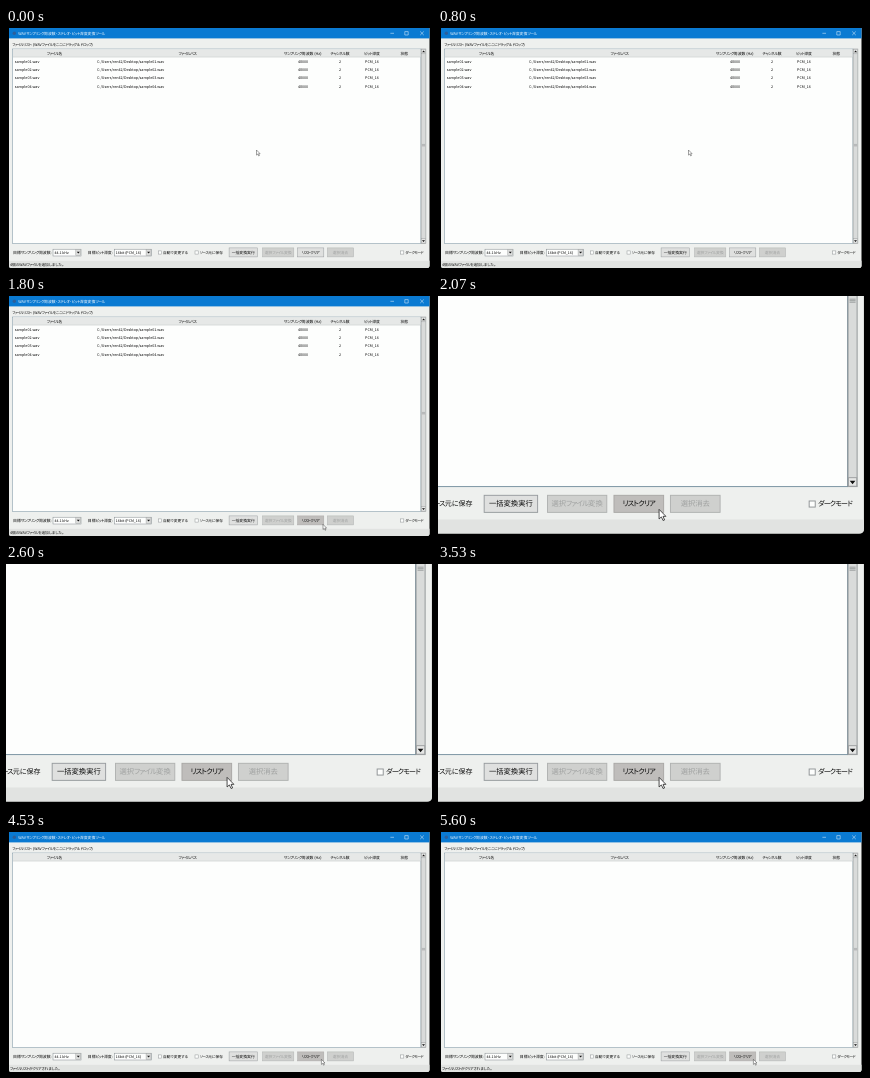
An HTML page that plays this animation: 426x240 px, repeating every 5790 ms.

```html
<!DOCTYPE html>
<html>
<head>
<meta charset="utf-8">
<title>WAV converter</title>
<style>
  html, body { margin: 0; width: 100%; height: 100%; overflow: hidden; background: #000; }
  svg { display: block; width: 100vw; height: 100vh; }
  text {
    font-family: "Noto Sans CJK JP", "Noto Sans CJK", "Noto Sans", sans-serif;
    font-feature-settings: "palt";
    text-rendering: geometricPrecision;
    white-space: pre;
  }
  .kana { letter-spacing: -0.11em; }
</style>
</head>
<body>
<svg id="stage" viewBox="0 0 426 240"></svg>
<script>
const NS = "http://www.w3.org/2000/svg";
const LOOP = 5790;
const TICK = 1000 / 15;
const ZOOM = { from: 2070, to: 3600, matrix: "matrix(1.895 0 0 1.895 -376.6 -217.4)" };
const HOVER_AT = 1600;
const CLEAR_AT = 4470;
const BAR_Y = 224.4;

// time, x, y of the pointer tip
const PATH = [
  [1100, 250.5, 122],
  [1200, 282, 166],
  [1330, 321, 220.5],
  [1470, 322, 224],
  [1780, 317, 228.4]
];

function add(parent, tag, attrs) {
  const el = document.createElementNS(NS, tag);
  for (const k in attrs) el.setAttribute(k, attrs[k]);
  parent.appendChild(el);
  return el;
}

const win = add(document.getElementById("stage"), "g", {});

function box(x, y, width, height, fill, stroke, parent = win) {
  const attrs = { x, y, width, height, fill };
  if (stroke) Object.assign(attrs, { stroke, "stroke-width": 0.5 });
  return add(parent, "rect", attrs);
}

function line(d, stroke, width = 0.5, parent = win) {
  return add(parent, "path", { d, stroke, "stroke-width": width, fill: "none" });
}

// Katakana runs are set tighter than the rest of the text.
function setText(el, str) {
  el.textContent = "";
  for (const run of str.split(/([ァ-ヺー]+)/).filter(Boolean)) {
    const kana = /^[ァ-ヺー]/.test(run);
    add(el, "tspan", kana ? { class: "kana" } : {}).textContent = run;
  }
}

function label(str, x, y, { anchor = "start", size = 3.7, fill = "#080808", parent = win } = {}) {
  const el = add(parent, "text", {
    x, y: y + size * 0.36, "text-anchor": anchor, fill, style: `font-size:${size}px`
  });
  setText(el, str);
  return el;
}

const mid = (str, x, y, opts = {}) => label(str, x, y, { ...opts, anchor: "middle" });

function button(str, x, w, enabled) {
  const face = box(x, 219.9, w, 9, enabled ? "#dfe0df" : "#cfd0ce", enabled ? "#979b9e" : "#b0b2b1");
  mid(str, x + w / 2, BAR_Y, { size: 3.85, fill: enabled ? "#080808" : "#9fa1a0" });
  return face;
}

function check(str, x) {
  box(x, 222.9, 3.2, 3.2, "#fdfefd", "#8f9395");
  label(str, x + 4.7, BAR_Y, { size: 3.7 });
}

function combo(str, x, w) {
  box(x, 221.2, w, 6.8, "#fdfefd", "#80878c");
  box(x + w - 5.2, 221.5, 4.9, 6.2, "#dcdddc", "#a0a3a4");
  add(win, "path", { d: `M${x + w - 4.2} 223.7h3l-1.5 1.9z`, fill: "#111" });
  label(str, x + 1.5, BAR_Y, { size: 3.6 });
}

function frame() {
  add(win, "path", { d: "M3 0H423.5V237.5Q423.5 240 421 240H5Q3 240 3 238Z", fill: "#eef0ee" });
  box(3, 0, 420.5, 10.4, "#0a7ad2");
  add(win, "circle", { cx: 8.3, cy: 5.3, r: 1.7, fill: "#2c5f9b" });
  label("WAVサンプリング周波数・ステレオ・ビット深度変換ツール", 12.2, 5.4, { size: 3.85, fill: "#f8fbff" });
  line("M384.4 5.3h3.6M398.8 3.6h3.4v3.4h-3.4zM414.2 3.5l3.6 3.6m0-3.6l-3.6 3.6", "#eef6fd");
  label("ファイルリスト: (WAVファイルをここにドラッグ & ドロップ)", 6.3, 16.2, { size: 3.65 });
}

function table() {
  box(6.7, 21, 408.2, 194.3, "#fdfefd", "#76909f");
  box(7, 21.3, 407.6, 7.8, "#e6e8e7");
  line("M7 29.1H414.6", "#b9bcbc", 0.4);
  const heads = [
    ["ファイル名", 48.5], ["ファイルパス", 181.5], ["サンプリング周波数 (Hz)", 296.7],
    ["チャンネル数", 334], ["ビット深度", 366], ["状態", 398.3]
  ];
  for (const [str, x] of heads) mid(str, x, 25.3, { size: 3.85 });

  const rows = add(win, "g", {});
  for (let i = 0; i < 4; i++) {
    const y = 33.8 + i * 8.15;
    const file = `sample0${i + 1}.wav`;
    const opts = { parent: rows };
    label(file, 8.8, y, opts);
    label("C:/Users/ren42/Desktop/" + file, 91, y, opts);
    mid("48000", 297, y, opts);
    mid("2", 334, y, opts);
    mid("PCM_16", 366, y, opts);
  }
  return rows;
}

function scrollbar() {
  box(415.1, 21, 4.8, 194.3, "#d9dbda", "#8f9496");
  box(415.3, 21.2, 4.4, 4.6, "#e6e7e6", "#9a9d9e");
  box(415.3, 210.6, 4.4, 4.5, "#e6e7e6", "#9a9d9e");
  add(win, "path", { d: "M416.1 24.3h3l-1.5-1.8zM416 212.2h3l-1.5 1.8z", fill: "#111" });
  line("M415.9 116.4h3.2m-3.2 .8h3.2m-3.2 .8h3.2", "#888c8e", 0.4);
}

function toolbar() {
  label("目標サンプリング周波数:", 7, BAR_Y, { size: 3.9 });
  combo("44.1 kHz", 47, 28);
  label("目標ビット深度:", 81.8, BAR_Y, { size: 3.9 });
  combo("16bit (PCM_16)", 108.3, 37);
  check("自動で変更する", 152.4);
  check("ソース元に保存", 189);
  button("一括変換実行", 223.1, 28.2, true);
  button("選択ファイル変換", 256.5, 31.3, false);
  const clear = button("リストクリア", 291.6, 26.2, true);
  button("選択消去", 321.4, 26.2, false);
  check("ダークモード", 394.6);
  return clear;
}

frame();
const rows = table();
scrollbar();
const clearBtn = toolbar();
add(win, "path", { d: "M3 232.7H423.5V237.5Q423.5 240 421 240H5Q3 240 3 238Z", fill: "#e1e3e1" });
const status = label("", 4, 236.7);
const pointer = add(win, "path", {
  d: "M0 0V5.1L1.2 4L2.1 5.9L2.9 5.6L2.1 3.7H3.6Z",
  fill: "#fff", stroke: "#222", "stroke-width": 0.42, "stroke-linejoin": "round"
});

function pointerAt(t) {
  if (t >= ZOOM.from) return [315.4, 227.3];
  const q = Math.floor(t / TICK + 0.06) * TICK;
  if (q <= PATH[0][0]) return PATH[0].slice(1);
  for (let i = 1; i < PATH.length; i++) {
    const [t0, x0, y0] = PATH[i - 1];
    const [t1, x1, y1] = PATH[i];
    if (q < t1) {
      const k = (q - t0) / (t1 - t0);
      return [x0 + (x1 - x0) * k, y0 + (y1 - y0) * k];
    }
  }
  return PATH[PATH.length - 1].slice(1);
}

let shown = "";

function draw(t) {
  const zoomed = t >= ZOOM.from && t < ZOOM.to;
  const cleared = t >= CLEAR_AT;
  win.setAttribute("transform", zoomed ? ZOOM.matrix : "translate(0 0)");
  rows.setAttribute("visibility", cleared ? "hidden" : "visible");
  const msg = cleared ? "ファイルリストがクリアされました。" : "4個のWAVファイルを追加しました。";
  if (shown !== msg) setText(status, shown = msg);
  const hover = t >= HOVER_AT;
  clearBtn.setAttribute("fill", hover ? "#bfbdbb" : "#dfe0df");
  clearBtn.setAttribute("stroke", hover ? "#a9a7a5" : "#979b9e");
  pointer.setAttribute("transform", `translate(${pointerAt(t).join(" ")})`);
}

const start = performance.now();
function loop() {
  draw((performance.now() - start) % LOOP);
  requestAnimationFrame(loop);
}
loop();
</script>
</body>
</html>
```
